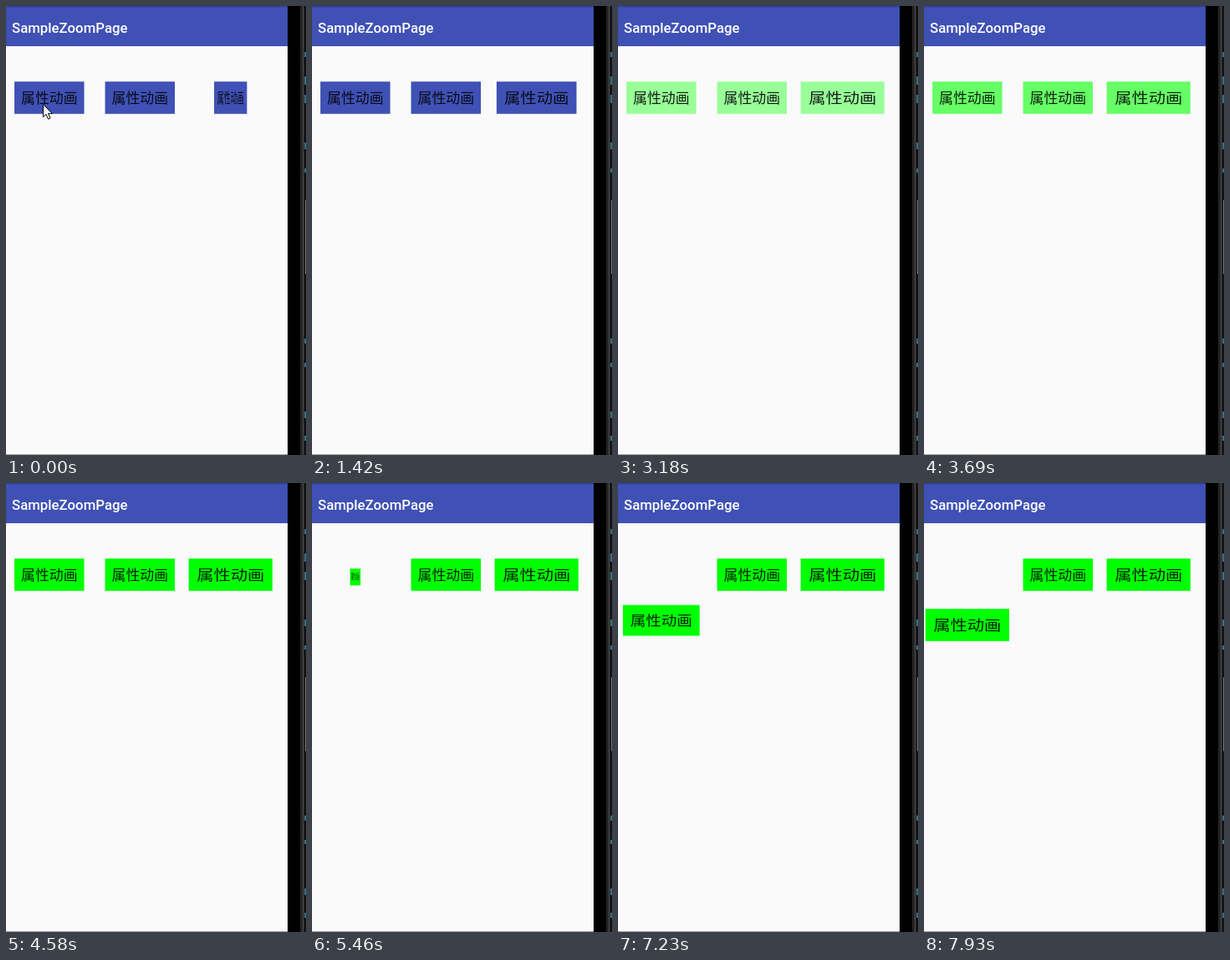
Write an HTML page that moves like this. It is 359 by 536 pixels and loops after 8 s.

```html
<!DOCTYPE html>
<html lang="zh">
<head>
<meta charset="utf-8">
<style>
  html, body { margin: 0; width: 100%; height: 100%; overflow: hidden; background: #fafafa; }
  svg { display: block; width: 359px; height: 536px; }
  .title { font: 500 16.8px Roboto, sans-serif; fill: #fff; }
  .label { font: 300 16.9px "Noto Sans CJK SC", "Noto Sans CJK", sans-serif; text-anchor: middle; fill: #000; fill-opacity: .88; }
</style>
</head>
<body>
<svg viewBox="0 0 359 536">
  <defs>
    <g id="button">
      <rect x="-41.75" y="-19.25" width="83.5" height="38.5"/>
      <text class="label" y="6.2">属性动画</text>
    </g>
  </defs>
  <rect width="337" height="536" fill="#fafafa"/>
  <rect width="337" height="48" fill="#3f51b5"/>
  <rect width="337" height="1.5" fill="#303f9f"/>
  <text class="title" x="7" y="31.5">SampleZoomPage</text>
  <g id="buttons"></g>
  <path id="cursor" d="M.5 .5V15.5L4 12.2L6.5 18L9 17L6.5 11.3H11.3Z" fill="#fff" stroke="#000" stroke-width="1"/>
  <rect y="535" width="337" height="1" fill="#a0a0a0"/>
  <rect x="337" width="22" height="536"/>
  <rect x="352" width="5" height="536" fill="#242424"/>
  <rect x="355" width="1" height="536" fill="#4c4c4c"/>
  <rect x="357" width="2" height="536" fill="#111"/>
  <rect x="358" y="232" width="1" height="88" fill="#777"/>
  <path d="M358 55v6M358 84v10M358 106v10M358 163v8M358 194v5M358 397v6M358 426v5M358 484v8M358 513v6" stroke="#3f8fb0" stroke-width="1.5"/>
</svg>
<script>
const LOOP = 8000;
const SVG_NS = "http://www.w3.org/2000/svg";
const CENTER_Y = 109.5;
const centers = [51.8, 160.3, 268.7];
const cursor = document.getElementById("cursor");

const buttons = centers.map(() => {
  const use = document.createElementNS(SVG_NS, "use");
  use.setAttribute("href", "#button");
  return document.getElementById("buttons").appendChild(use);
});

const mix = (a, b, p) => a + (b - a) * p;
const progress = (t, start, duration) => Math.min(1, Math.max(0, (t - start) / duration));
const ease = (t, start, duration) => 0.5 - 0.5 * Math.cos(Math.PI * progress(t, start, duration));

// White to green in steps of a tenth
function buttonColor(t) {
  if (t < 1810) return "#3f51b5";
  const p = ease(t, 1865, 3000);
  const level = p > 0.97 ? 1 : Math.floor(p * 10) / 10;
  const c = Math.round(255 * (1 - level));
  return `rgb(${c},255,${c})`;
}

function place(i, dy, sx, sy) {
  buttons[i].setAttribute("transform", `translate(${centers[i]} ${CENTER_Y + dy}) scale(${sx} ${sy})`);
}

function draw(t) {
  const color = buttonColor(t);
  buttons.forEach(b => b.setAttribute("fill", color));

  const drop = ease(t, 5100, 2650);
  if (t < 4850) place(0, 0, 1, 1);
  else place(0, mix(0, 60, drop), mix(0.1, 1.2, drop), mix(0.5, 1, drop));
  place(1, 0, 1, 1);
  place(2, 0, mix(0.1, 1.2, ease(t, -1210, 3070)), 1);

  const move = ease(t, 150, 700);
  cursor.setAttribute("transform", `translate(${mix(44, 230, move)} ${mix(117, 353, move)})`);
  cursor.setAttribute("visibility", t < 850 ? "visible" : "hidden");
}

function tick() {
  draw(performance.now() % LOOP);
  requestAnimationFrame(tick);
}
tick();
</script>
</body>
</html>
```
